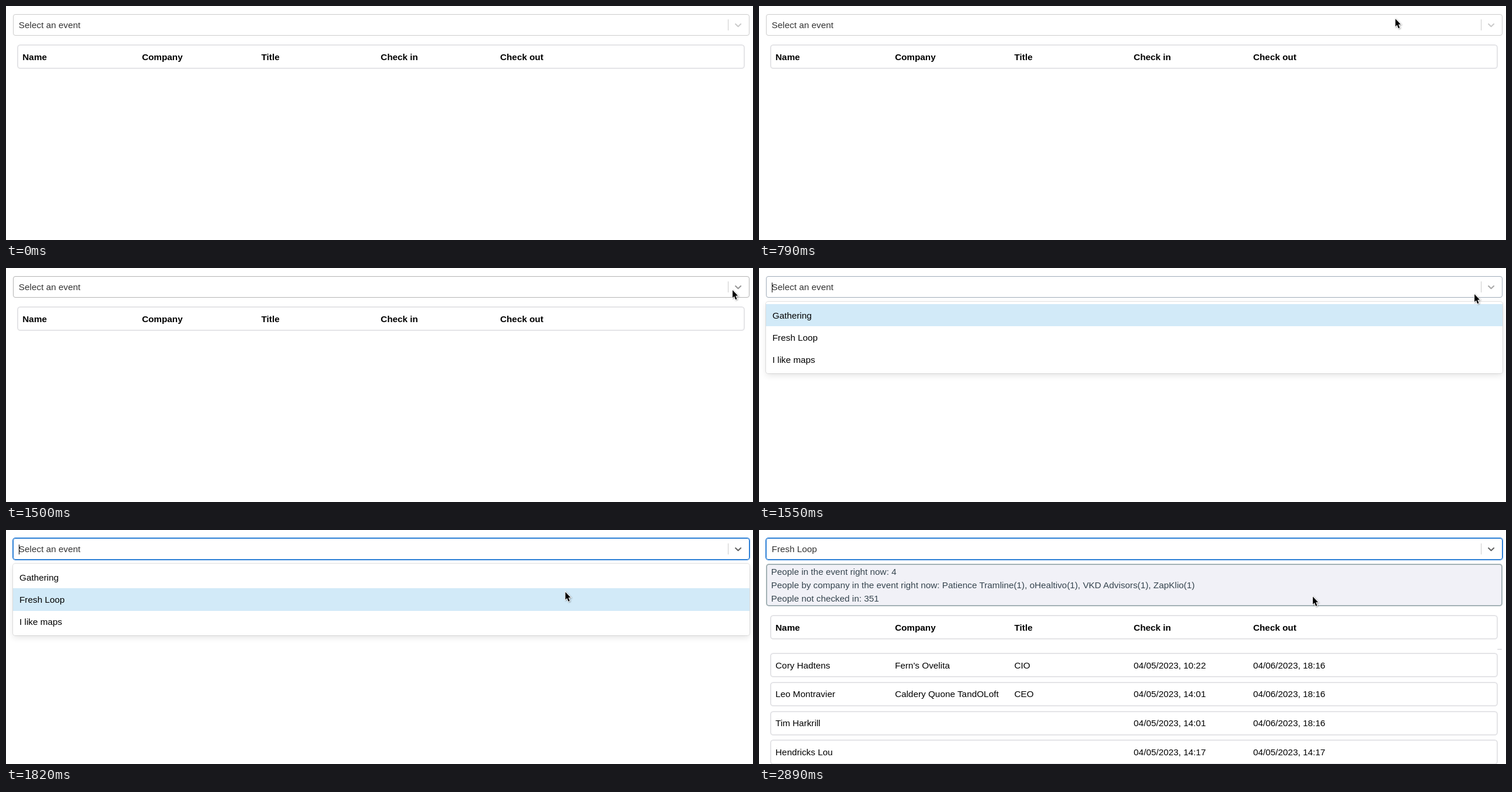
These frames come from a looping animation (1280 by 402 pixels, 3.88 s). An HTML page:

```html
<!DOCTYPE html>
<html lang="en">
<head>
<meta charset="utf-8">
<title>Event check-in</title>
<style>
  html, body { margin: 0; width: 100%; height: 100%; overflow: hidden; background: #fff; }
  body { position: relative; font: 15.33px/23px "Liberation Sans", Arial, sans-serif; color: #000; }
  body *, body { box-sizing: border-box; }
  div, svg, span { position: absolute; white-space: pre; }
  #control { left: 11.5px; top: 14.4px; width: 1262px; height: 36.4px; border: 1px solid #ccc; border-radius: 4px; }
  #value { left: 21.8px; top: 20.9px; color: #333; }
  #caret { left: 22px; top: 25px; width: 1px; height: 17px; background: #000; }
  #bar { left: 1237px; top: 23px; width: 1px; height: 19px; background: #ccc; }
  #chevron { left: 1245.4px; top: 23px; }
  #menu { left: 11.5px; top: 58.4px; width: 1262px; height: 122.6px; background: #fff; border-radius: 4px;
    box-shadow: 0 0 0 1px rgba(0,0,0,.1), 0 4px 11px rgba(0,0,0,.1); }
  .option { left: 0; width: 100%; height: 38.3px; padding: 7.6px 11.5px; }
  .row { left: 19.2px; width: 1246.4px; height: 42.2px; border: 2px solid #e4e4e7; border-radius: 5.5px; }
  .row span { top: 7.6px; }
  .head { font-weight: bold; }
  #summary { left: 11.5px; top: 58.3px; width: 1262px; height: 72.8px; padding-left: 7.2px;
    border: 2px solid #a3b1b5; border-radius: 5px; background: #f1f1f7; color: #36454f; }
  #dash { left: 1265px; top: 204px; width: 8px; height: 2px; background: #e2e2e5; border-radius: 1px; }
  #cursor { left: 0; top: 0; overflow: visible; filter: drop-shadow(1px 1px 1px rgba(0,0,0,.35)); }
</style>
</head>
<body>
<div id="control"></div>
<div id="value"></div>
<div id="caret"></div>
<div id="bar"></div>
<svg id="chevron" width="19.16" height="19.16" viewBox="0 0 20 20"><path d="M4.516 7.548c.436-.446 1.043-.481 1.576 0L10 11.295l3.908-3.747c.533-.481 1.141-.446 1.574 0 .436.445.408 1.197 0 1.615-.406.418-4.695 4.502-4.695 4.502a1.1 1.1 0 0 1-1.576 0S4.924 9.581 4.516 9.163s-.436-1.17 0-1.615z"/></svg>
<div id="table"></div>
<div id="result">
  <div id="summary">People in the event right now: 4
People by company in the event right now: Patience Tramline(1), oHealtivo(1), VKD Advisors(1), ZapKlio(1)
People not checked in: 351</div>
  <div id="dash"></div>
</div>
<div id="menu"></div>
<svg id="cursor" width="14" height="20"><path d="M0 0V13.2L2.9 10.6 5.1 16.2 7.4 15.2 5.1 9.8 9 9.4Z" stroke="#fff" stroke-width="1.8" paint-order="stroke"/></svg>
<script>
const LOOP = 3880, OPEN = 1545, PICK = 2890;
const $ = id => document.getElementById(id);
const show = (el, on) => { el.style.display = on ? "" : "none"; };

function add(parent, cls, top, html) {
  const el = document.createElement("div");
  el.className = cls;
  el.style.top = top + "px";
  el.innerHTML = html;
  parent.append(el);
  return el;
}
const addRow = (parent, top, cells, cls = "") => add(parent, "row " + cls, top,
  cells.map((c, i) => `<span style="left:${7.1 + 204.6 * i}px">${c}</span>`).join(""));

const events = ["Gathering", "Fresh Loop", "I like maps"];
const options = events.map((name, i) => add($("menu"), "option", 3.8 + 38.3 * i, name));

const head = addRow($("table"), 0, ["Name", "Company", "Title", "Check in", "Check out"], "head");
[
  ["Cory Hadtens", "Fern's Ovelita", "CIO", "04/05/2023, 10:22", "04/06/2023, 18:16"],
  ["Leo Montravier", "Caldery Quone TandOLoft", "CEO", "04/05/2023, 14:01", "04/06/2023, 18:16"],
  ["Tim Harkrill", "", "", "04/05/2023, 14:01", "04/06/2023, 18:16"],
  ["Hendricks Lou", "", "", "04/05/2023, 14:17", "04/05/2023, 14:17"]
].forEach((cells, i) => addRow($("result"), 211 + 49.8 * i, cells));

// Keys are [time, value, value, ...], joined by straight lines.
function at(keys, t) {
  let i = keys.findIndex(k => k[0] > t);
  if (i < 0) i = keys.length;
  const a = keys[Math.max(i - 1, 0)], b = keys[Math.min(i, keys.length - 1)];
  const u = b[0] > a[0] ? (t - a[0]) / (b[0] - a[0]) : 0;
  return a.slice(1).map((v, j) => v + (b[j + 1] - v) * u);
}
const rgb = c => `rgb(${c.map(Math.round)})`;

const path = [
  [550, 930, 375], [646, 1000, 210], [742, 1066, 68], [790, 1090.5, 22], [838, 1130, 2],
  [886, 1178, 4], [934, 1218, 16], [982, 1238, 28], [1030, 1247, 34], [1080, 1249, 36],
  [1240, 1250, 37], [1500, 1245, 38], [1545, 1226, 45], [1590, 1180, 60], [1680, 1055, 88],
  [1770, 974, 102], [1815, 958.5, 106.5], [1950, 949, 114.5]
];
const border = [[790, 204, 204, 204], [890, 179, 179, 179], [1535, 179, 179, 179], [1645, 43, 127, 214]];
const arrow = [[1080, 204], [1230, 153], [1500, 153], [1550, 170], [1700, 102]];

// The pointer is seen at a coarse, regular rate.
function held(t) {
  if (t < 1078) return 550 + Math.floor((t - 550) / 48) * 48;
  if (t < 1500) return 1080 + Math.floor((t - 1080) / 53) * 53;
  return 1500 + Math.floor((t - 1500) / 45) * 45;
}

function draw(t) {
  const picked = t >= PICK, open = t >= OPEN && !picked;
  const color = rgb(at(border, t)), glow = Math.min(1, Math.max(0, (t - 1555) / 90));
  $("control").style.borderColor = color;
  $("control").style.boxShadow = `0 0 0 1px rgba(43,127,214,${glow})`;
  const grey = at(arrow, t)[0];
  $("chevron").style.fill = rgb([grey, grey, grey]);
  $("value").textContent = picked ? events[1] : "Select an event";
  show($("caret"), t >= OPEN && t < 2090);

  head.style.top = (picked ? 146.3 : 66.2) + "px";
  show($("result"), picked);
  show($("menu"), open);

  const [x, y] = at(path, held(t));
  const over = y > 100.6 ? 1 : 0;
  options.forEach((el, i) => {
    el.style.background = i !== over ? "none" : t >= 2140 ? "#add6f5" : "#d2eaf8";
  });
  show($("cursor"), t >= 550);
  $("cursor").style.transform = `translate(${x}px,${y}px)`;
}

const start = performance.now();
function tick() {
  draw((performance.now() - start) % LOOP);
  requestAnimationFrame(tick);
}
tick();
</script>
</body>
</html>
```
